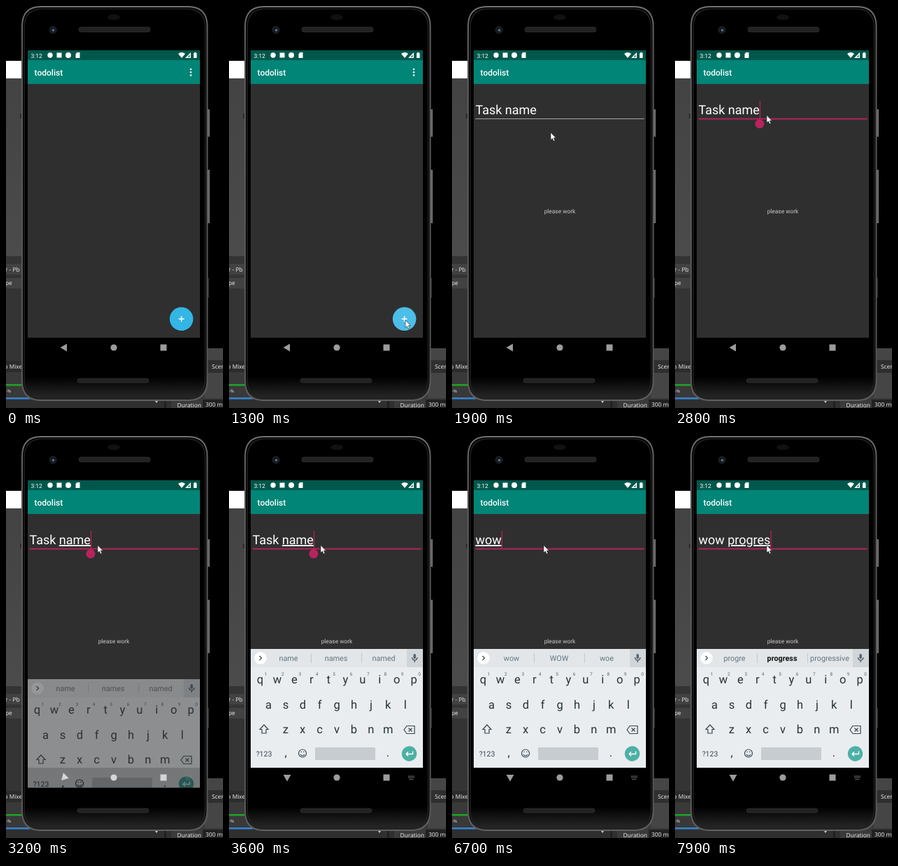
Write an HTML page that moves like this. It is 310 px wide and 572 px high and loops after 8000 ms.

```html
<!DOCTYPE html>
<html lang="en">
<head>
<meta charset="utf-8">
<title>Todo list on a phone</title>
<style>
html, body { margin: 0; width: 100%; height: 100%; overflow: hidden; background: #000; }
svg { display: block; font-family: Roboto, sans-serif; text-rendering: geometricPrecision; }
text { white-space: pre; }
.mid { text-anchor: middle; }
.desk { font: 8.3px "Noto Sans", sans-serif; fill: #e4e6e8; }
.title { font-size: 12px; font-weight: 500; fill: #fff; }
.key { font-size: 16.5px; fill: #263238; }
.hint { font-size: 6.5px; fill: #56646c; }
.word { font-size: 10.8px; fill: #65747d; }
.line { fill: none; stroke: #37474f; stroke-width: 1.2; }
</style>
</head>
<body>
<svg width="310" height="572" viewBox="0 0 310 572">
  <defs>
    <linearGradient id="pane" x2="0" y2="1"><stop stop-color="#434343"/><stop offset="1" stop-color="#4b4b4b"/></linearGradient>
    <linearGradient id="rim" x2="0" y2="1"><stop stop-color="#707070"/><stop offset=".1" stop-color="#5c5c5c"/><stop offset=".9" stop-color="#565656"/><stop offset="1" stop-color="#606060"/></linearGradient>
    <linearGradient id="shell" x2="0" y2="1"><stop offset=".94"/><stop offset=".99" stop-color="#242424"/></linearGradient>
    <clipPath id="screen"><path d="M31 63H277V500.500H31Z"/></clipPath>
    <clipPath id="body"><path d="M31 77H277V472H31Z"/></clipPath>
  </defs>

  <g id="desktop">
    <path fill="#fff" d="M0 78H30V103H0Z"/>
    <path fill="url(#pane)" d="M0 103H30V356H0Z"/>
    <path fill="#343434" d="M0 356H30V505H0Z"/>
    <path fill="#424242" d="M0 367H30V382H0ZM0 387H30V402H0Z"/>
    <path fill="#2c2c2c" d="M0 505H30V521H0Z"/>
    <path fill="#393939" d="M0 521H310V560H0Z"/>
    <path fill="#2f2f2f" d="M0 560H310V572H0Z"/>
    <path fill="#454545" d="M284 487H310V504H284ZM284 522H310V558H284Z"/>
    <path fill="#2f2f2f" d="M284 504H310V522H284Z"/>
    <path fill="#3a3a3a" d="M236 560H281V572H236Z"/>
    <path fill="#212121" d="M281 560H310V572H281ZM226 560H229V572H226Z"/>
    <path fill="#1ca422" d="M0 538H30V540.500H0Z"/>
    <path fill="#3583d2" d="M0 557H34V559.500H0Z"/>
    <path fill="#ccc" d="M213 562H217L215 565Z"/>
    <g class="desk">
      <text x="-1" y="378">r - Pb</text><text x="-1" y="397">pe</text>
      <text x="-2.500" y="516">o Mixer</text><text x="0" y="550" font-size="6">-%</text>
      <text x="294" y="516">Scenes</text>
      <text x="244.500" y="571">Duration</text><text x="285" y="570">300 ms</text>
    </g>
  </g>

  <g id="phone">
    <path fill="#6a6a6a" d="M287 147H291V186H287ZM287 233H291V309H287Z"/>
    <path fill="#2b2b2b" d="M287 387H290V415H287ZM20 153H23V160H20Z"/>
    <path fill="url(#shell)" stroke="url(#rim)" stroke-width="2" d="M50 1H260Q287.500 1 287.500 29V534Q287 560 262 561H48Q23 560 23 534V29Q23 1 50 1Z"/>
    <path fill="none" stroke="#222" stroke-width="1.500" d="M52 4H258Q284.500 4 284.500 31V533Q283 557 261 558H49Q27 557 26 533V31Q26 4 52 4Z"/>
    <ellipse cx="154" cy="16" rx="9" ry="4" fill="#111"/>
    <rect x="104" y="30" width="102" height="7" rx="3" fill="#222" stroke="#363636" stroke-width=".6"/>
    <rect x="102" y="530" width="102" height="6" rx="3" fill="#222" stroke="#363636" stroke-width=".6"/>
    <circle cx="67" cy="34" r="5" fill="#17191c" stroke="#2e3136" stroke-width=".7"/><circle cx="67.500" cy="34.500" r="1.700" fill="#5574a5"/>
  </g>

  <path fill="#2f2f2f" d="M31 111H277V472H31Z"/>
  <path fill="#008577" d="M31 77H277V111H31Z"/>
  <g id="list">
    <text class="title" x="40.600" y="98.500">todolist</text>
    <g fill="#fff"><circle cx="264" cy="90" r="1.300"/><circle cx="264" cy="94.300" r="1.300"/><circle cx="264" cy="98.600" r="1.300"/></g>
    <circle cx="250.600" cy="446.300" r="17" fill="#000" opacity=".2"/>
    <circle cx="250.600" cy="445.300" r="16.800" fill="#33b5e5"/>
    <circle id="ripple" cx="250.600" cy="445.300" fill="#fff"/>
    <path stroke="#fff" stroke-width="1.500" d="M246.600 445.300H254.600M250.600 441.300V449.300"/>
  </g>

  <g clip-path="url(#body)"><g id="editor">
    <path fill="#2f2f2f" d="M31 111H277V492H31Z"/>
    <path fill="#008577" d="M31 77H277V111H31Z"/>
    <text class="title" x="40.600" y="98.500">todolist</text>
    <text x="33.400" y="154" font-size="18" fill="#fff"><tspan id="done"></tspan><tspan id="typing"></tspan></text>
    <rect id="rule" x="33.400" width="241.200"/>
    <rect id="caret" y="135" width="1.200" height="25" fill="#c51f5e"/>
    <path id="handle" fill="#b9235e" d="M0 160.500L4.600 163A6.500 6.500 0 1 1-4.600 163Z"/>
    <text class="mid" x="154" y="294.500" font-size="8.400" fill="#cacaca">please work</text>
  </g></g>

  <path fill="#00574b" d="M31 63H277V77H31Z"/>
  <g fill="#fff">
    <text x="35.500" y="73.500" font-size="8.500">3:12</text>
    <circle cx="63" cy="70" r="3.700"/><path d="M72.500 66.500H79.500V73.500H72.500Z"/><circle cx="89" cy="70" r="4"/>
    <path d="M101.500 66H105.500V74H99.500V68Z"/>
    <path d="M246 68Q251 64 256 68L251 74ZM264 66V74H256Z"/>
    <path d="M268 67H269V66H271.500V67H272.500V74H268Z"/>
    <path fill="#00574b" d="M262.500 69.500V72.500H259.500Z"/>
  </g>

  <g clip-path="url(#screen)"><g id="keyboard"></g></g>
  <g id="nav" fill="#9c9c9c">
    <path id="back" d="M77.500 486L87 480.500V491.500Z"/>
    <circle cx="154" cy="486" r="4.600"/><path d="M220.500 481.500H229.500V490.500H220.500Z"/>
    <path id="ime" stroke="#9c9c9c" stroke-dasharray="1.300 .8" d="M256 484H265M256 486H265M257.500 488.500H263.500"/>
  </g>
  <path id="cursor" fill="#fff" stroke="#222" stroke-width=".6" d="M0 0V10.500L2.400 8.400L4.200 12.300L6 11.500L4.300 7.700H7.500Z"/>
</svg>
<script>
const $ = id => document.getElementById(id);
const set = (id, attrs) => { for (const k in attrs) $(id).setAttribute(k, attrs[k]); };
const label = (cls, x, y, s, more = '') => `<text class="${cls}" x="${x}" y="${y}" ${more}>${s}</text>`;
const row = (letters, x, y) => [...letters].map((c, i) => label('key mid', x + i * 24.4, y, c)).join('');

$('keyboard').innerHTML = `
  <path fill="#e9edf0" d="M31 303H277V472H31Z"/>
  <path fill="#e2e6e9" d="M31 303H277V329H31Z"/>
  <path fill="#d0d5d9" d="M254 303H277V329H254Z"/>
  <circle cx="45" cy="316" r="8.700" fill="#fff"/>
  <path class="line" d="M43.500 313L46.500 316L43.500 319"/>
  <path stroke="#c2c8cc" d="M117.500 309V323M189.500 309V323"/>
  ${[85, 153, 221].map((x, i) => label('word mid', x, 320, '', `id="word${i}"`)).join('')}
  <rect x="263.500" y="310" width="3.400" height="7" rx="1.700" fill="#546069"/>
  <path class="line" d="M261.500 315Q262 319 265.200 319T269 315M265.200 319V322"/>
  ${row('qwertyuiop', 44.5, 352)}${row('asdfghjkl', 56.5, 387.500)}${row('zxcvbnm', 80.8, 423)}
  ${[...'1234567890'].map((c, i) => label('hint mid', 52.5 + i * 24.4, 340.5, c)).join('')}
  <path class="line" d="M50 411L56 417.500H53V423H47V417.500H44Z"/>
  <path class="line" d="M250 418L254 412.500H265V423.500H254ZM256.500 415.500L261.500 420.500M261.500 415.500L256.500 420.500"/>
  ${label('mid', 50, 455.5, '?123', 'font-size="10.500" fill="#37474f"')}
  ${label('key mid', 81, 456, ',')}${label('key mid', 227, 456, '.')}
  <circle class="line" cx="105" cy="451.500" r="5.500"/>
  <path class="line" d="M102 453Q105 457 108 453M102.500 449.500H104M106 449.500H107.500"/>
  <rect x="123" y="443" width="86" height="18" rx="1.500" fill="#c7ccd0"/>
  <circle cx="257.500" cy="452" r="10.700" fill="#4db0a5"/>
  <path fill="none" stroke="#fff" stroke-width="1.300" d="M262.500 448.500V452.500H253M256 449.500L253 452.500L256 455.500"/>`;

// Steps of the edit: time, text, suggestions (kept when omitted)
const edits = [
  [0, 'Task name', 'name names named'], [4000, 'Task nam'], [4500, 'Task n'], [4600, 'Task'],
  [4700, 'Ta'], [4800, ''], [6400, 'w'], [6500, 'wo', 'w we was'], [6600, 'wow', 'wo would work'],
  [6700, 'wow', 'wow WOW woe'], [7100, 'wow '], [7200, 'wow p', 'I that and'],
  [7300, 'wow pr', 'p please people'], [7400, 'wow pro', 'pr pretty probably'],
  [7500, 'wow prog', 'pro probably problem'], [7600, 'wow progr', 'prog program progress'],
  [7700, 'wow progre', 'progr program progress'], [7800, 'wow progre', 'progre progress progressive'],
  [7900, 'wow progres']
];
const path = [[400, 8, 546], [800, 252, 447], [1400, 252, 447], [1900, 141, 180], [2400, 131, 155.5]];

const ramp = (t, from, to) => Math.min(1, Math.max(0, (t - from) / (to - from)));
const easeOut = p => 1 - (1 - p) ** 2;

function pointer(t) {
  let [, x, y] = path[0];
  for (let i = 1; i < path.length; i++) {
    const p = easeOut(ramp(t, path[i - 1][0], path[i][0]));
    x += (path[i][1] - path[i - 1][1]) * p;
    y += (path[i][2] - path[i - 1][2]) * p;
  }
  return [x, y];
}

function drawText(t) {
  const past = edits.filter(e => e[0] <= t);
  const text = past.at(-1)[1];
  const words = past.filter(e => e[2]).at(-1)[2].split(' ');
  const cut = text.lastIndexOf(' ') + 1;
  $('done').textContent = text.slice(0, cut);
  $('typing').textContent = text.slice(cut);
  $('typing').style.textDecoration = t >= 3000 ? 'underline' : 'none';
  const end = 33.4 + (text ? $('done').parentNode.getComputedTextLength() : 0);
  const focused = t >= 2600;
  const blink = (t >= 5300 && t < 5800) || (t >= 6300 && t < 6400);
  set('caret', { x: end, opacity: focused && !blink ? 1 : 0 });
  set('handle', { transform: `translate(${end} 0)`, opacity: t >= 2700 && t < 4000 ? 1 : 0 });
  set('rule', { y: focused ? 159.7 : 160, height: focused ? 1.8 : 1, fill: focused ? '#b9235e' : '#a6a6a6' });
  words.forEach((w, i) => {
    const strong = w === 'progress' && i === 1;
    $('word' + i).textContent = w;
    $('word' + i).style.cssText = strong ? 'font-weight:700;fill:#111' : '';
  });
}

function draw(t) {
  const press = ramp(t, 900, 1300);
  const enter = easeOut(ramp(t, 1300, 1700));
  const rise = ramp(t, 3000, 3400);
  set('ripple', { r: 16.8 * press, opacity: 0.12 });
  set('editor', { opacity: enter, transform: `translate(0 ${20 * (1 - enter)})` });
  set('keyboard', { opacity: rise, transform: `translate(0 ${172 * (1 - rise) ** 2})` });
  set('back', { transform: `rotate(${-90 * rise} 83 486)` });
  set('ime', { opacity: rise });
  set('nav', { fill: rise > 0 && rise < 1 ? '#d5d5d5' : '#9c9c9c' });
  const [x, y] = pointer(t);
  set('cursor', { transform: `translate(${x} ${y})`, opacity: t < 400 ? 0 : 1 });
  drawText(t);
}

function tick() {
  draw(Math.floor(performance.now() % 8000 / 100) * 100);
  requestAnimationFrame(tick);
}
tick();
</script>
</body>
</html>
```
